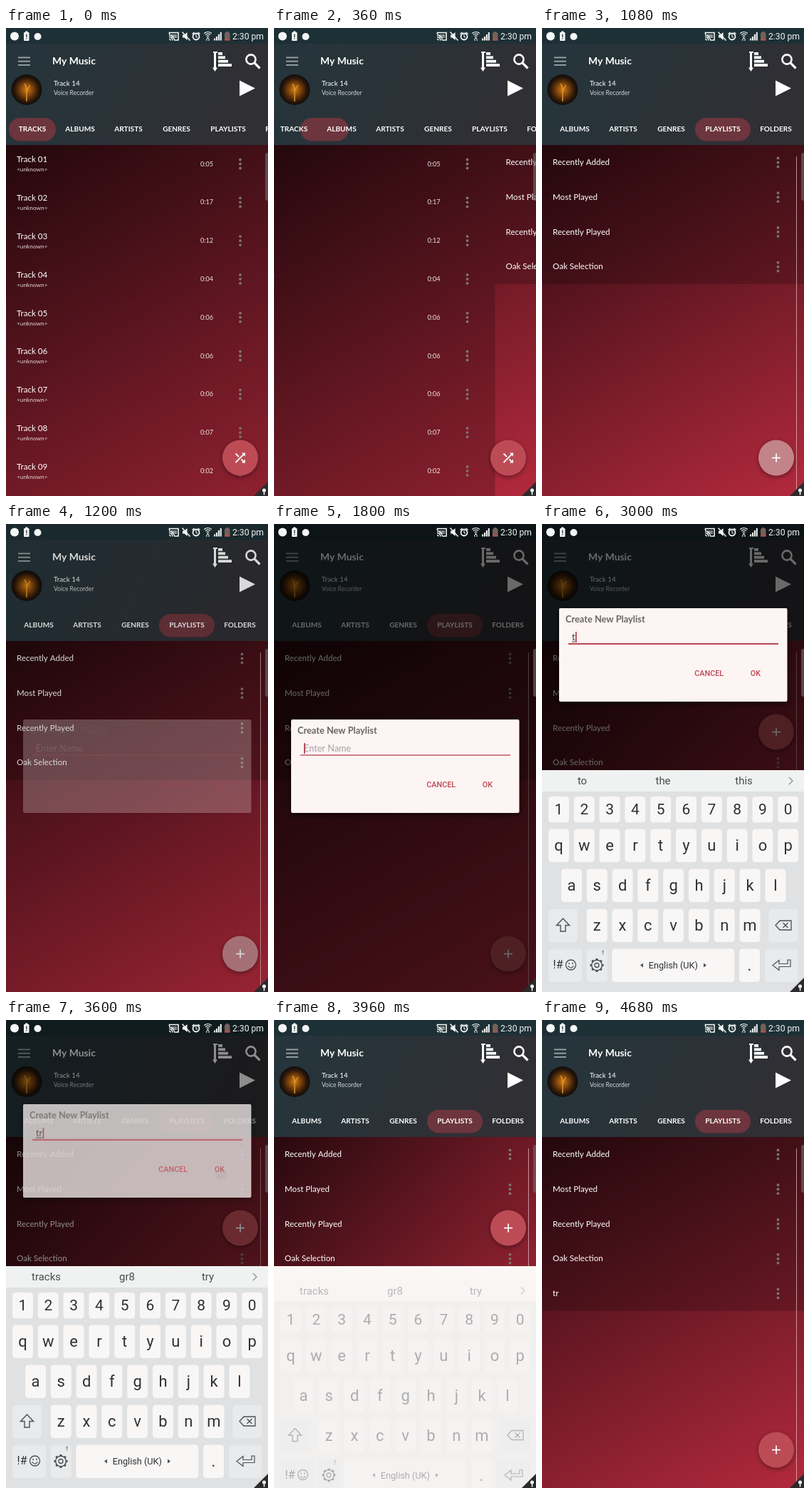
Write an HTML page with a canvas that moves like this. It is 368x656 px and loops after 4800 ms.

```html
<!DOCTYPE html>
<html lang="en">
<head>
<meta charset="utf-8">
<title>Music player</title>
<style>
html, body { margin: 0; width: 100%; height: 100%; overflow: hidden; background: #000; }
canvas { display: block; width: 368px; height: 656px; }
</style>
</head>
<body>
<canvas id="stage"></canvas>
<script>
const W = 368, H = 656, LOOP = 4800, STEP = 120;
const canvas = document.getElementById('stage');
const c = canvas.getContext('2d');
const dpr = window.devicePixelRatio || 1;
canvas.width = W * dpr;
canvas.height = H * dpr;

const UI = 'Lato, "Open Sans", sans-serif';
const SYS = 'Roboto, sans-serif';
const ROW = 48.75, LIST_TOP = 164, KEYS_TOP = 345;
const TRACK_LENGTHS = ['0:05', '0:17', '0:12', '0:04', '0:06', '0:06', '0:06', '0:07', '0:02'];
const PLAYLISTS = ['Recently Added', 'Most Played', 'Recently Played', 'Oak Selection'];
const TABS = [['TRACKS', 37], ['ALBUMS', 104], ['ARTISTS', 172], ['GENRES', 239.5], ['PLAYLISTS', 312], ['FOLDERS', 386.5]];

const ramp = (t, a, b) => Math.min(1, Math.max(0, (t - a) / (b - a)));
const mix = (a, b, p) => a + (b - a) * p;
const smooth = p => p * p * (3 - 2 * p);

// y is the middle of the capitals
function text(s, x, y, size, color, { align = 'left', weight = 400, family = UI } = {}) {
  c.font = `${weight} ${size}px ${family}`;
  c.textAlign = align;
  c.fillStyle = color;
  c.fillText(s, x, y + size * 0.34);
}

function rect(x, y, w, h, color) {
  c.fillStyle = color;
  c.fillRect(x, y, w, h);
}

function round(x, y, w, h, r, color) {
  c.beginPath();
  c.roundRect(x, y, w, h, r);
  c.fillStyle = color;
  c.fill();
}

function disc(x, y, r, color) {
  c.beginPath();
  c.arc(x, y, r, 0, 7);
  c.fillStyle = color;
  c.fill();
}

function path(points, close) {
  c.beginPath();
  for (let i = 0; i < points.length; i += 2) c.lineTo(points[i], points[i + 1]);
  if (close) c.closePath();
}

function poly(points, color) {
  path(points, true);
  c.fillStyle = color;
  c.fill();
}

function line(points, color, width = 1, close = false) {
  path(points, close);
  c.strokeStyle = color;
  c.lineWidth = width;
  c.stroke();
}

function arc(x, y, r, a, b, color, width) {
  c.beginPath();
  c.arc(x, y, r, a, b);
  c.strokeStyle = color;
  c.lineWidth = width;
  c.stroke();
}

function blend(x0, y0, x1, y1, ...colors) {
  const g = c.createLinearGradient(x0, y0, x1, y1);
  colors.forEach((k, i) => g.addColorStop(i / (colors.length - 1), k));
  return g;
}

function dots(x, y) {
  for (const d of [-6, 0, 6]) disc(x, y + d, 1.9, '#7f7571');
}

// The gradient runs from corner to corner of the visible window
function drawBackdrop(h) {
  if (h < H) rect(0, h, W, H - h, '#fbf7f5');
  rect(0, 0, W, h, blend(0, 0, W, h, '#0c0203', '#5f1621', '#b3293c'));
}

function drawTracks(x, h) {
  rect(x, LIST_TOP, W, h - LIST_TOP, 'rgba(0,0,0,.2)');
  TRACK_LENGTHS.forEach((len, i) => {
    const y = 190.5 + i * 53.8;
    text('Track 0' + (i + 1), x + 15, y - 6, 11.6, '#fff');
    text('<unknown>', x + 15, y + 8, 8.3, '#e2d6d7');
    text(len, x + 282, y, 9.1, '#eee4e4', { align: 'center' });
    dots(x + 329, y);
  });
}

function drawPlaylists(x, h, names) {
  rect(x, LIST_TOP, W, Math.min(h - LIST_TOP, names.length * ROW), 'rgba(0,0,0,.2)');
  names.forEach((name, i) => {
    const y = LIST_TOP + (i + 0.5) * ROW;
    text(name, x + 15, y - 0.3, 11.6, '#fff');
    dots(x + 331.5, y);
  });
  rect(x + 357, 180, 1, h - 180, 'rgba(235,200,204,.7)');
}

function drawArt() {
  const g = c.createRadialGradient(29, 86, 1, 29, 87, 21.5);
  g.addColorStop(0, '#c97a14');
  g.addColorStop(0.35, '#84480c');
  g.addColorStop(0.75, '#2e1909');
  g.addColorStop(1, '#100c0b');
  disc(29, 86.5, 21.5, g);
  line([29, 103, 29, 84, 26, 78], '#e09a28', 1.4);
  line([29, 88, 34, 80], '#e09a28', 1.2);
}

function drawHeader(p) {
  rect(0, 0, W, LIST_TOP, blend(40, 22, 300, LIST_TOP, '#25353b', '#302f34'));
  rect(0, 0, W, 22, '#1d3036');
  for (const y of [40.5, 45.8, 51]) rect(17, y, 17, 1.8, '#9ea4a6');
  text('My Music', 65, 46.5, 13.9, '#fff', { weight: 700 });

  rect(292, 33, 3, 25, '#fff');
  rect(291, 33, 6, 2, '#fff');
  poly([290, 55.5, 297, 55.5, 293.5, 61], '#fff');
  [6, 10, 14, 19].forEach((w, i) => rect(298, 34 + i * 5.4, w, 3.8, '#fff'));
  arc(344, 44, 6.6, 0, 7, '#fff', 2.6);
  line([348.7, 48.7, 356.5, 56.5], '#fff', 3.2);

  drawArt();
  text('Track 14', 67, 78, 9.8, '#fff');
  text('Voice Recorder', 67, 91.5, 8.5, '#d3d6d8');
  poly([328, 73.5, 350, 84.5, 328, 95.5], '#fff');

  const scroll = 58 * p;
  round(mix(4, 215, p), 126, mix(66, 78, p), 32.5, 16.2, '#6d353d');
  for (const [name, x] of TABS)
    text(name, x - scroll, 142, 10.1, '#fff', { align: 'center', weight: 700 });
}

function drawFab(y, add, press) {
  c.save();
  c.shadowColor = 'rgba(0,0,0,.4)';
  c.shadowBlur = 6 * dpr;
  c.shadowOffsetY = 2 * dpr;
  disc(329, y, 25, '#bd4b56');
  c.restore();
  if (press) disc(329, y, 25, `rgba(200,190,188,${0.5 * press})`);
  if (add) {
    rect(323, y - 0.8, 12, 1.7, '#fff');
    rect(328.2, y - 6, 1.7, 12, '#fff');
    return;
  }
  line([322.5, y - 6, 327, y - 1.5], '#fff', 1.8);
  line([322.5, y + 6.5, 335, y - 6], '#fff', 1.8);
  line([330.5, y + 2, 335, y + 6.5], '#fff', 1.8);
  poly([331, y - 7, 336, y - 7, 336, y - 2], '#fff');
  poly([331, y + 7, 336, y + 7, 336, y + 2], '#fff');
}

function drawDialog(y, alpha, typed, t) {
  c.save();
  c.globalAlpha = alpha;
  c.shadowColor = `rgba(0,0,0,${0.6 * alpha})`;
  c.shadowBlur = 9 * dpr;
  c.shadowOffsetY = 3 * dpr;
  round(24, y, 320.5, 131, 2, '#fdf4f4');
  c.shadowColor = 'transparent';
  text('Create New Playlist', 33, y + 16, 12.8, '#6a6666', { weight: 700 });
  let caret = 42;
  if (typed) {
    text(typed, 42, y + 41, 12.7, '#3d3838');
    const w = c.measureText(typed).width;
    rect(42, y + 46.5, w, 1, '#3d3838');
    caret += w + 0.5;
  } else {
    text('Enter Name', 42, y + 40.5, 12.7, '#a9a2a2');
  }
  if ((t + 120) % 960 < 480 || t >= 3480) rect(caret, y + 33, 1.6, 15, '#a8364a');
  const thick = t < 2520 ? 1.4 : 2.2;
  rect(37, y + 50 - thick / 2, 295, thick, '#b9505c');
  if (t >= 3360) disc(302, y + 98, 8, 'rgba(160,150,150,.25)');
  const button = { align: 'center', weight: 500, family: SYS };
  text('CANCEL', 234.7, y + 91.7, 10.8, '#bd4652', button);
  text('OK', 300, y + 91.7, 10.8, '#bd4652', button);
  c.restore();
}

function key(x, y, w, h, label, size = 21, color = '#f9f6f6') {
  round(x, y, w, h, 4.5, color);
  if (label) text(label, x + w / 2, y + h / 2, size, '#2f3234', { align: 'center', family: SYS });
}

function drawGear(x, y) {
  const ink = '#4b5053';
  for (let i = 0; i < 8; i++) {
    const a = i * Math.PI / 4, dx = Math.cos(a), dy = Math.sin(a);
    line([x + dx * 7, y + dy * 7, x + dx * 9.5, y + dy * 9.5], ink, 3);
  }
  arc(x, y, 7.3, 0, 7, ink, 1.4);
  arc(x, y, 3, 0, 7, ink, 1.3);
}

function drawKeyboard(dy, alpha, words) {
  const ink = '#4b5053', side = '#e9eaec', pitch = 35.8;
  c.save();
  c.globalAlpha = alpha;
  c.translate(0, dy);
  rect(0, KEYS_TOP, W, 30, '#f0f1f1');
  rect(0, KEYS_TOP + 30, W, H - KEYS_TOP - 30, '#dfe1e2');
  words.forEach((w, i) => text(w, 56.5 + i * 113.5, 360, 14.9, '#484c4e', { align: 'center', family: SYS }));
  line([347, 355, 352, 360, 347, 365], '#8b8f91', 1.3);

  [...'1234567890'].forEach((k, i) => key(9 + i * pitch, 382, 29, 36.5, k));
  [...'qwertyuiop'].forEach((k, i) => key(9 + i * pitch, 427.5, 29, 46.5, k, 22));
  [...'asdfghjkl'].forEach((k, i) => key(27 + i * pitch, 483.5, 29, 46.5, k, 22));
  [...'zxcvbnm'].forEach((k, i) => key(62.7 + i * pitch, 539.5, 29, 46.5, k, 22));

  key(9, 539.5, 41, 46.5, '', 0, side);
  line([29.5, 553, 38.5, 562.5, 33, 562.5, 33, 571, 26, 571, 26, 562.5, 20.5, 562.5], ink, 1.4, true);
  key(318.5, 539.5, 41, 46.5, '', 0, side);
  line([328, 562.5, 334, 556, 350, 556, 350, 569, 334, 569], ink, 1.3, true);
  line([338.5, 559, 345.5, 566], ink, 1.3);
  line([345.5, 559, 338.5, 566], ink, 1.3);

  key(9, 595.5, 47, 46.5, '', 0, side);
  text('!#', 15.5, 618, 16, '#2f3234', { family: SYS });
  arc(40.5, 618, 7, 0, 7, ink, 1.3);
  arc(40.5, 618.5, 3.6, 0.2, 2.95, ink, 1.2);
  disc(38, 616, 1, ink);
  disc(43, 616, 1, ink);
  key(62.7, 595.5, 29, 46.5, '', 0, side);
  drawGear(77, 618.5);
  round(84.2, 597, 2.8, 5, 1.4, '#a6aaad');
  rect(85.1, 602, 1, 2.5, '#a6aaad');
  key(98.3, 595.5, 172, 46.5, 'English (UK)', 12.7);
  poly([142, 615.5, 142, 621.5, 138, 618.5], ink);
  poly([227, 615.5, 227, 621.5, 231, 618.5], ink);
  key(277, 595.5, 29, 46.5, '.', 22);
  key(313, 595.5, 46.5, 46.5, '', 0, side);
  line([349, 611, 349, 620.5, 333, 620.5, 333, 625.5, 324, 618.5, 333, 611.5, 333, 616.5, 345, 616.5, 345, 611], ink, 1.2, true);
  c.restore();
}

function drawStatus() {
  const ink = '#f4f6f6', gap = '#1d3036';
  disc(12, 11.5, 6, ink);
  round(25, 6, 7.5, 12, 1, ink);
  rect(27, 4.5, 3.5, 2, ink);
  rect(28.2, 8.5, 1.3, 4.5, gap);
  rect(28.2, 14, 1.3, 1.5, gap);
  disc(44.5, 12, 5, ink);

  line([229.5, 9, 229.5, 6.5, 242, 6.5, 242, 17, 237, 17], ink, 1.6);
  rect(232, 9, 8, 5, 'rgba(244,246,246,.5)');
  for (const r of [2, 5, 7.5]) arc(229, 17.5, r, -Math.PI / 2, 0, ink, 1.4);
  poly([248, 9.5, 250.5, 9.5, 254.5, 6, 254.5, 17, 250.5, 13.5, 248, 13.5], ink);
  line([247.5, 5.5, 258.5, 17.5], ink, 1.5);
  arc(267, 12, 4.5, 0, 7, ink, 1.8);
  line([267, 9, 267, 12.3, 269, 13.5], ink, 1.1);
  line([261.5, 8.5, 264.5, 6], ink, 1.6);
  line([272.5, 8.5, 269.5, 6], ink, 1.6);
  for (const r of [3, 5.8, 8.4]) arc(283.5, 14, r, -2.25, -0.9, ink, 1.2);
  disc(283.5, 14, 1.2, ink);
  line([281.8, 15, 281.8, 18], ink, 1);
  line([285, 15, 285, 18], ink, 1);
  [3, 5.5, 8.5, 11.5].forEach((h, i) => rect(292 + i * 2.9, 17.5 - h, 2.1, h, ink));
  round(307, 6.5, 7.5, 11, 1, '#75605c');
  rect(309, 5, 3.5, 2, '#75605c');
  rect(307, 15.5, 7.5, 2, '#b5503f');
  text('2:30 pm', 318, 11.5, 12.2, ink, { family: SYS });
}

function drawEdges() {
  round(364, 175, 8, 67, 3, 'rgba(120,106,110,.6)');
  poly([348, H, W, 636, W, H], '#2b2b2d');
  disc(362.5, 648, 2.5, '#fff');
  rect(361.8, 649, 1.5, 5.5, '#fff');
}

function draw(t) {
  c.setTransform(dpr, 0, 0, dpr, 0, 0);
  const slide = smooth(ramp(t, 240, 720));
  const open = ramp(t, 1140, 1380) * (1 - ramp(t, 3560, 3720));
  const h = t >= 2640 && t < 4080 ? KEYS_TOP : H;
  const names = t >= 3720 ? [...PLAYLISTS, 'tr'] : PLAYLISTS;
  const typed = t < 2880 ? '' : t < 3120 ? 't' : 'tr';

  drawBackdrop(h);
  c.save();
  c.beginPath();
  c.rect(0, 0, W, h);
  c.clip();
  if (slide < 1) drawTracks(-W * slide, h);
  if (slide > 0) drawPlaylists(W * (1 - slide), h, names);
  drawHeader(slide);
  drawFab(h - 53.5, slide > 0.5, ramp(t, 900, 1080) * (1 - ramp(t, 1200, 1440)));
  c.restore();

  if (open > 0) {
    rect(0, 0, W, H, `rgba(0,0,0,${0.59 * open})`);
    const lift = 1 - Math.pow(1 - ramp(t, 2400, 2640), 2.08);
    drawDialog(Math.round(mix(274, 118, lift)), open, typed, t);
  }

  if (t >= 2520 && t < 4080) {
    const enter = ramp(t, 2400, 2528), leave = ramp(t, 3840, 3960);
    const words = typed === 'tr' ? ['tracks', 'gr8', 'try'] : typed ? ['to', 'the', 'this'] : [];
    if (enter < 1) rect(0, KEYS_TOP + 1, W, H, '#000');
    drawKeyboard(Math.round(16 * (1 - enter)) + 19.5 * leave, enter * mix(1, 0.36, leave), words);
  }

  drawStatus();
  drawEdges();
}

const start = performance.now();
function tick() {
  const t = (performance.now() - start) % LOOP;
  draw(Math.floor(t / STEP) * STEP);
  requestAnimationFrame(tick);
}
tick();
</script>
</body>
</html>
```
